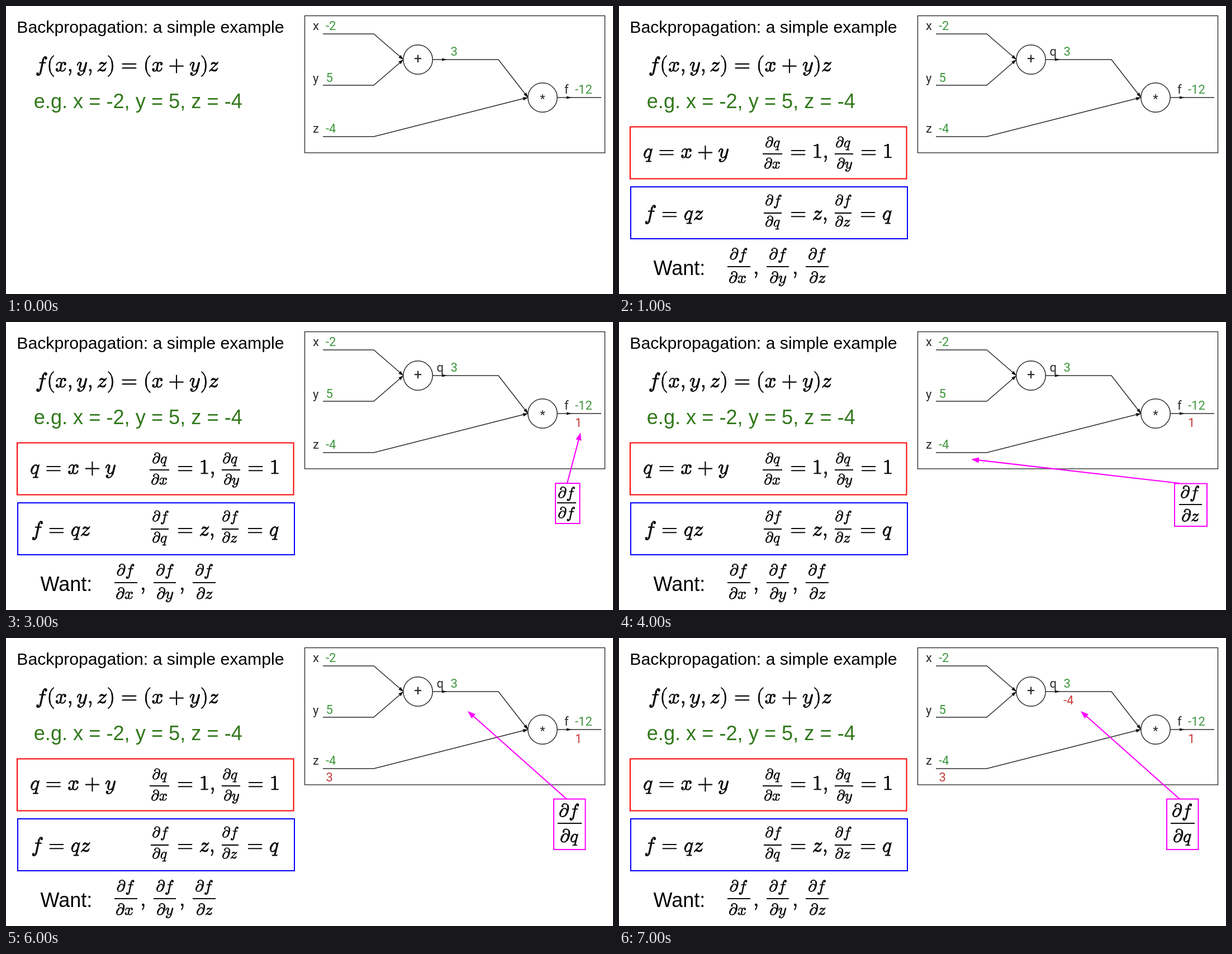
These frames come from a looping animation (1086x516 px, 8 s). An HTML page with a canvas:

```html
<!DOCTYPE html>
<html lang="en">
<head>
<meta charset="utf-8">
<title>Backpropagation: a simple example</title>
<style>
html, body { margin: 0; width: 100%; height: 100%; overflow: hidden; background: #fff; }
canvas { display: block; }
</style>
</head>
<body>
<canvas id="stage" width="1086" height="516"></canvas>
<script>
const ctx = document.getElementById('stage').getContext('2d');
const STEP_MS = 1000, STEPS = 8;
const INK = '#2b2b2b', GREEN = '#3d963d', RED = '#c83a3a', MAGENTA = '#ff00ff';
const SANS = '"Liberation Sans", Arial, sans-serif';
const LABEL = '400 22px Roboto, sans-serif';
const PEN_WEIGHT = 16;

// Pen strokes per symbol: [width, path], 1000 units per em, y pointing up.
const PEN = {
  x: [572,
    [68, 'M306 352C290 280 266 190 252 88'],
    [40, 'M72 290C90 360 150 423 217 423C270 423 305 400 306 350C330 400 370 423 425 423C460 423 485 408 500 380'],
    [40, 'M252 90C258 40 290 8 335 8C400 8 465 60 487 143M252 90C225 30 180 8 130 8C100 8 75 20 57 55'],
    [104, 'M468 342h1M88 92h1']],
  y: [510,
    [72, 'M208 372C200 300 143 200 143 105'],
    [40, 'M39 288C60 360 100 423 155 423C195 423 214 405 212 365M141 110C135 40 175 8 235 8C280 8 320 50 338 80'],
    [74, 'M458 394L356 -8'],
    [42, 'M358 0C330 -120 240 -186 157 -186C105 -186 65 -165 64 -115'],
    [104, 'M97 -97h1']],
  z: [480,
    [36, 'M452 430C390 320 150 130 55 4M136 332C150 360 155 365 170 378M360 45C395 70 415 105 425 143'],
    [70, 'M185 378C225 425 270 395 310 372C340 355 370 352 395 362M130 70C190 85 230 27 285 27C335 27 360 45 375 65']],
  q: [460,
    [74, 'M165 345C115 290 76 200 76 125'],
    [40, 'M362 340C350 400 320 423 278 423C235 423 190 395 155 340M72 130C68 50 110 8 172 8C220 8 260 40 295 88'],
    [66, 'M404 375L275 -145'],
    [24, 'M375 375L448 430'],
    [42, 'M164 -171H375']],
  f: [545,
    [72, 'M372 570C350 440 300 200 268 60C255 0 245 -50 232 -95'],
    [42, 'M374 560C392 640 420 687 462 687C505 687 530 665 530 630M234 -85C215 -150 180 -187 140 -187C100 -187 75 -165 75 -130'],
    [104, 'M497 613h1M108 -114h1'],
    [44, 'M210 408H478']],
  '∂': [550,
    [80, 'M508 580C545 450 480 200 385 88'],
    [44, 'M195 590C220 660 280 695 345 695C440 695 510 640 523 520'],
    [44, 'M405 110C350 30 290 0 225 0C140 0 82 45 82 140M165 345C220 420 270 447 330 447C400 447 450 400 448 320'],
    [82, 'M185 355C120 280 87 200 87 120'],
    [100, 'M211 560h1']],
  1: [500,
    [74, 'M256 625V40'],
    [40, 'M98 582C160 582 215 602 256 642M102 20H408']],
  '(': [389,
    [38, 'M318 735C60 550 60 -50 318 -235'],
    [56, 'M150 470C118 340 118 160 150 30']],
  ')': [389,
    [38, 'M71 735C329 550 329 -50 71 -235'],
    [56, 'M239 470C271 340 271 160 239 30']],
  ',': [445,
    [104, 'M139 55h1'],
    [36, 'M176 40C180 -50 150 -125 108 -175']],
  '=': [778, [42, 'M76 347H702M76 153H702']],
  '+': [778, [42, 'M76 250H702M389 563V-63']],
  ' ': [278],
  '~': [222],
};
for (const key in PEN) {
  const [advance, ...strokes] = PEN[key];
  PEN[key] = { advance, strokes: strokes.map(([width, d]) => ({ width, path: new Path2D(d) })) };
}

function text(str, x, y, font, color) {
  ctx.font = font;
  ctx.fillStyle = color;
  ctx.fillText(str, x, y);
}

function math(str, x, y, size = 37.5) {
  ctx.save();
  ctx.translate(x, y);
  ctx.scale(size / 1000, -size / 1000);
  ctx.strokeStyle = '#0c0c0c';
  ctx.lineCap = ctx.lineJoin = 'round';
  for (const ch of str) {
    const { advance, strokes } = PEN[ch];
    for (const { width, path } of strokes) {
      ctx.lineWidth = width + PEN_WEIGHT;
      ctx.stroke(path);
    }
    ctx.translate(advance, 0);
  }
  ctx.restore();
}

function line(points, color, width) {
  ctx.strokeStyle = color;
  ctx.lineWidth = width;
  ctx.beginPath();
  points.forEach(([x, y]) => ctx.lineTo(x, y));
  ctx.stroke();
}

function box(x, y, w, h, color, width) {
  ctx.strokeStyle = color;
  ctx.lineWidth = width;
  ctx.strokeRect(x, y, w, h);
}

function head(x, y, angle, length, half, color) {
  ctx.save();
  ctx.translate(x, y);
  ctx.rotate(angle);
  ctx.fillStyle = color;
  ctx.beginPath();
  ctx.moveTo(0, 0);
  ctx.lineTo(-length, -half);
  ctx.lineTo(-length, half);
  ctx.fill();
  ctx.restore();
}

// Derivative: rule from x1 to x2, each line placed at its own left edge and baseline.
function fraction(top, bottom, x1, x2, y, size, topAt, bottomAt) {
  line([[x1, y], [x2, y]], '#0c0c0c', 2.2);
  math('∂' + top, topAt[0] - size * 0.042, topAt[1], size);
  math('∂' + bottom, bottomAt[0] - size * 0.042, bottomAt[1], size);
}

function wire(...points) {
  line(points, INK, 1.5);
}

function node(x, y, sign, size, baseline) {
  ctx.strokeStyle = INK;
  ctx.lineWidth = 1.5;
  ctx.beginPath();
  ctx.arc(x, y, 26.2, 0, Math.PI * 2);
  ctx.stroke();
  ctx.textAlign = 'center';
  text(sign, x, baseline, `400 ${size}px Roboto, sans-serif`, INK);
  ctx.textAlign = 'left';
}

function label(str, x, y, color = INK) {
  text(str, x, y, LABEL, color);
}

function drawGraph() {
  box(534.5, 17.5, 537, 245.5, '#222', 1.3);
  wire([567, 50], [658, 50], [710, 95]);
  wire([567, 142], [658, 142], [710, 97]);
  wire([763, 96], [881, 96], [933, 163]);
  wire([567, 234], [658, 234], [933, 164]);
  wire([986, 164], [1065, 164]);
  head(711, 96, Math.atan2(45, 52), 9, 3, '#111');
  head(711, 96, Math.atan2(-45, 52), 9, 3, '#111');
  head(789, 96, 0, 9, 2.6, '#111');
  head(934, 164, Math.atan2(67, 52), 9, 3, '#111');
  head(934, 164, Math.atan2(-70, 275), 9, 3, '#111');
  head(1012, 164, 0, 9, 2.6, '#111');
  node(737, 96, '+', 25, 103);
  node(960, 164, '*', 22, 174);
  label('x', 549, 43);
  label('-2', 572, 43, GREEN);
  label('y', 549, 136.5);
  label('5', 572.5, 136, GREEN);
  label('z', 549, 226.5);
  label('-4', 572, 226.5, GREEN);
  label('3', 795.5, 89, GREEN);
  label('f', 999, 157);
  label('-12', 1018, 157, GREEN);
}

function drawRules() {
  label('q', 770.5, 89);

  box(20, 216.5, 494.5, 93, '#ff0000', 2);
  math('q = x~+~y', 42.8, 272);
  fraction('q', 'x', 257, 292, 265, 27, [262, 253], [260, 291]);
  math('= 1,', 306, 272);
  fraction('q', 'y', 386, 419, 265, 27, [388, 253], [390, 291]);
  math('= 1', 432, 272);

  box(21, 324, 495, 93, '#0000ff', 2);
  math('f = qz', 45, 383);
  fraction('f', 'q', 259, 291, 371, 27, [262, 357], [262, 395]);
  math('= z,', 306, 383);
  fraction('f', 'z', 386, 416, 371, 27, [387, 357], [387, 395]);
  math('= q', 431, 383);

  text('Want:', 61.5, 482, '36px ' + SANS, '#000');
  fraction('f', 'x', 194, 235, 467, 29, [198.5, 454], [197, 496]);
  math(',', 240, 480);
  fraction('f', 'y', 264, 304, 467, 29, [269, 454], [270, 496]);
  math(',', 310, 480);
  fraction('f', 'z', 334, 375, 467, 29, [339, 454], [341, 496]);
}

function pointer(x1, y1, x2, y2) {
  const angle = Math.atan2(y2 - y1, x2 - x1);
  line([[x1, y1], [x2 - 8 * Math.cos(angle), y2 - 8 * Math.sin(angle)]], MAGENTA, 2.1);
  head(x2, y2, angle, 14, 5.2, MAGENTA);
}

const callouts = [
  () => {
    box(983, 289, 43.5, 72, MAGENTA, 2);
    fraction('f', 'f', 986, 1020, 324, 28, [988, 315], [988, 351]);
    pointer(1004, 289, 1028, 198);
  },
  () => {
    box(994, 289.5, 58, 76.5, MAGENTA, 2);
    fraction('f', 'z', 1002, 1043, 327, 31, [1005, 315], [1007, 357]);
    pointer(1003, 289, 630, 246);
  },
  () => {
    box(980, 288.5, 56.5, 90.5, MAGENTA, 2);
    fraction('f', 'q', 987, 1030, 332, 33, [990, 320], [992, 365.5]);
    pointer(1003, 288.5, 826, 131);
  },
];

function draw(step) {
  ctx.fillStyle = '#fff';
  ctx.fillRect(0, 0, 1086, 516);
  text('Backpropagation: a simple example', 19.3, 48, '30.2px ' + SANS, '#000');
  math('f(x,y,z) = (x~+~y)z', 52.5, 117, 37.8);
  text('e.g. x = -2, y = 5, z = -4', 49.7, 183, '36.2px ' + SANS, '#30781a');
  drawGraph();
  if (step >= 1) drawRules();
  if (step >= 3) label('1', 1018, 187.5, RED);
  if (step >= 5) label('3', 572.5, 257, RED);
  if (step >= 7) label('-4', 795, 119, RED);
  if (step >= 2) callouts[Math.floor(step / 2) - 1]();
}

let start, shown;
function tick(now) {
  start ??= now;
  const step = Math.floor((now - start) / STEP_MS) % STEPS;
  if (step !== shown) draw(shown = step);
  requestAnimationFrame(tick);
}
requestAnimationFrame(tick);
</script>
</body>
</html>
```
